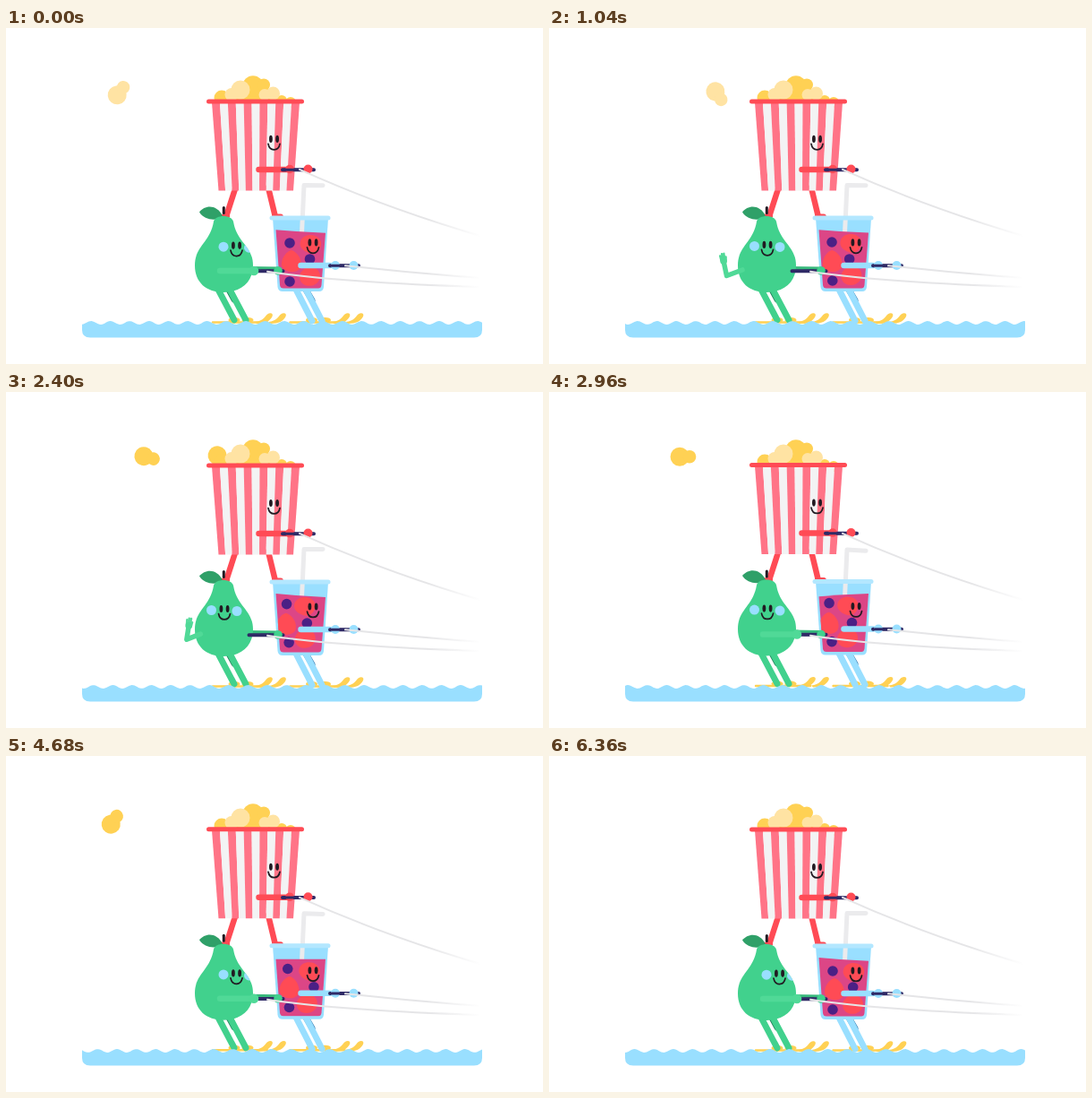
These frames come from a looping animation (600x375 px, 6.4 s). An HTML page:

```html
<!DOCTYPE html>
<html lang="en">
<head>
<meta charset="utf-8">
<title>Water-skiing snacks</title>
<style>
  html, body { margin: 0; width: 100%; height: 100%; overflow: hidden; background: #fff; }
  svg { display: block; width: 100vw; height: 100vh; }
  .line { fill: none; stroke-linecap: round; stroke-linejoin: round; }
</style>
</head>
<body>
<svg viewBox="0 0 600 375">
  <defs>
    <linearGradient id="fade" gradientUnits="userSpaceOnUse" x1="290" y1="0" x2="530" y2="0">
      <stop offset=".75" stop-color="#e5e5e7"/>
      <stop offset="1" stop-color="#e5e5e7" stop-opacity="0"/>
    </linearGradient>
    <clipPath id="juiceClip"><path id="juiceEdge"/></clipPath>
    <clipPath id="pearClip"><use href="#pearBody"/></clipPath>
    <path id="pearBody" d="M232 216C234 208 252 208 254 216C258 240 276 243 276 265C276 284 262 295 243 295C224 295 211 284 211 265C211 243 228 240 232 216Z"/>
    <g id="face">
      <ellipse cx="-3.6" rx="1.9" ry="4.1" fill="#211a22"/>
      <ellipse cx="3.6" rx="1.9" ry="4.1" fill="#211a22"/>
      <path class="line" d="M-6.5 5.5C-5 14 5 14 6.5 5.5" stroke="#211a22" stroke-width="1.7"/>
    </g>
    <g id="skis" fill="#ffd154">
      <path class="line" d="M-19 328.500H42" stroke="#ffd154" stroke-width="2.4"/>
      <ellipse cx="5" cy="326" rx="6.5" ry="3"/>
      <ellipse cx="20" cy="326" rx="6.5" ry="3"/>
      <path d="M28 328C38 327 39 322 42 319.5C46 317 49 319 47.500 322C45 327 40 330 30 330Z"/>
      <path d="M43 328C53 327 54 322 57 319.500C61 317 64 319 62.500 322C60 327 55 330 45 330Z"/>
    </g>
  </defs>

  <g id="flying"></g>
  <g id="pile"></g>

  <g id="skiers">
    <use href="#skis" x="250"/>
    <use href="#skis" x="336.500"/>

    <!-- popcorn -->
    <g class="line" stroke="#ff4b55" stroke-width="6.500" stroke-linecap="butt">
      <path d="M256.500 178L246.500 209M293 178L300.500 209"/>
    </g>
    <path d="M237 211.500C237 206.500 244 207.500 250 207.500V211.500ZM297 211.500V207.500H307Q310 207.500 310 211.500Z" fill="#ff4b55"/>
    <g id="stripes"></g>
    <path class="line" d="M226.500 82H330.500" stroke="#ff4b55" stroke-width="5"/>
    <use href="#face" x="299.500" y="124"/>

    <!-- drink -->
    <g class="line" stroke="#99dfff" stroke-width="7">
      <path d="M335 292L342 304" stroke="#4384b5"/>
      <path d="M323 290L342 327M334 290L353 327"/>
    </g>
    <path d="M298 212H360L355 289Q354.500 294 350 294H309Q304 294 303.500 289Z" fill="#99dfff"/>
    <path id="straw" class="line" stroke="#ebebed" stroke-width="5"/>
    <g clip-path="url(#juiceClip)">
      <rect x="298" y="215" width="64" height="80" fill="#dc4686"/>
      <g id="fruit" fill="#ff4b55">
        <path d="M328 237C331 227 349 228 351 238C352 247 344 253 337 250C331 248 326 243 328 237Z"/>
        <path d="M318 247C325 249 332 260 327 268C321 274 309 271 307 264C306 257 312 248 318 247Z"/>
        <path d="M331 269C338 262 351 267 350 277C349 286 337 290 330 284C326 280 326 273 331 269Z"/>
      </g>
      <g fill="#4b2085"><circle id="berry1" r="5.800"/><circle id="berry2" r="5.800"/><circle id="berry3" r="5.800"/></g>
    </g>
    <path class="line" d="M297 212H360" stroke="#b3e7ff" stroke-width="5"/>
    <use href="#face" x="343" y="239.500"/>

    <!-- pear -->
    <g class="line" stroke="#41d18d" stroke-width="7">
      <path d="M249 292L255 303" stroke="#26845f"/>
      <path d="M236 290L255 326M249 290L268 326"/>
      <path d="M268 269L304 269.500" stroke="#38b97c" stroke-width="6"/>
    </g>
    <path d="M242 210C235 196 222 198 216 205.500C222 215 236 216 242 210Z" fill="#2fa068"/>
    <use href="#pearBody" fill="#41d18d"/>
    <path class="line" d="M243.300 200.500V206.500" stroke="#211a22" stroke-width="3"/>
    <g clip-path="url(#pearClip)">
      <g id="pearFace">
        <circle cx="229.500" cy="243.500" r="5.500" fill="#99dfff"/>
        <circle cx="258" cy="244.500" r="5.500" fill="#99dfff"/>
        <use href="#face" x="244" y="242"/>
      </g>
    </g>

    <!-- arms, handles and ropes -->
    <g class="line">
      <path d="M282.500 158H318" stroke="#ff4b55" stroke-width="6.500"/>
      <path d="M329.500 265H362" stroke="#99dfff" stroke-width="6.500"/>
    </g>
    <path class="line" d="M309 158.300H344M362 265.300H394M271.500 271.300H309.500" stroke="#2f2a66" stroke-width="4"/>
    <g fill="#ff4b55"><circle cx="317" cy="157.500" r="4.800"/><circle cx="337.500" cy="157.500" r="5"/></g>
    <g fill="#99dfff"><circle cx="368" cy="265" r="5"/><circle cx="388.500" cy="265" r="5"/></g>
    <circle cx="304" cy="271" r="4.800" fill="#41d18d"/>
    <path class="line" d="M311 158.300H329M364 265.300H380M285 271.300H296" stroke="#2f2a66" stroke-width="3"/>
    <path id="arm" class="line" stroke="#50d997" stroke-width="6"/>
    <g id="hand">
      <circle id="palm" fill="#50d997"/>
      <path id="fingers" class="line" stroke="#50d997" stroke-width="2.400" d="M-2.500 -1L-3 -6M-.5 -2L-.8 -8M1.500 -1L1.500 -8M2.500 1L3.200 -4"/>
    </g>
  </g>

  <g class="line" stroke="url(#fade)" stroke-width="2">
    <path d="M328 157.800Q420 199.500 530 232"/>
    <path d="M379 265.300Q455 273.500 530 279"/>
    <path d="M292 271.800Q370 284 530 289"/>
  </g>
  <path id="water" fill="#99dfff"/>
</svg>

<script>
const LOOP = 6400, RIPPLE = 1280, TAU = Math.PI * 2;
const YELLOW = '#ffd154', PALE = '#ffe3a3';
const $ = id => document.getElementById(id);
const set = (el, attrs) => { for (const k in attrs) el.setAttribute(k, attrs[k]); };
const mix = (a, b, p) => a + (b - a) * p;
const wave = (t, period, phase = 0) => Math.cos(TAU * (t / period + phase));
const circle = (x, y, r, fill) => `<circle cx="${x}" cy="${y}" r="${r}" fill="${fill}"/>`;

function ramp(t, from, to) {
  const p = Math.min(1, Math.max(0, (t - from) / (to - from)));
  return p * p * (3 - 2 * p);
}

// Popcorn heap and bucket stripes
$('pile').innerHTML =
  `<path d="M236 82L250 74L270 66L292 70L304 78L322 82Z" fill="${YELLOW}"/>` +
  circle(241, 78, 8.5, YELLOW) + circle(276, 64.7, 11.5, YELLOW) + circle(288, 63.5, 7, YELLOW) +
  circle(252, 74.5, 7.5, PALE) + circle(262, 69, 10.5, PALE) +
  circle(308, 81, 6, YELLOW) + circle(318, 83, 6, YELLOW) +
  circle(298.5, 73, 7.5, PALE) + circle(289, 74.5, 6.5, PALE);

$('stripes').innerHTML = Array.from({ length: 11 }, (_, i) => {
  const top = k => 230 + 98 * k / 11, low = k => 237.5 + 83.5 * k / 11;
  const fill = i % 2 ? '#f3f3f4' : '#ff7487';
  return `<path d="M${top(i)} 83H${top(i + 1)}L${low(i + 1)} 181.500H${low(i)}Z" fill="${fill}"/>`;
}).join('');

// Launch time and colour of each kernel blown off the heap
const kernels = [
  [-595, PALE], [165, YELLOW], [829, PALE], [1990, YELLOW], [2501, YELLOW],
  [3680, PALE], [4042, YELLOW], [4825, PALE], [5480, YELLOW]
].map(([start, fill]) => {
  const el = document.createElementNS('http://www.w3.org/2000/svg', 'g');
  el.innerHTML = circle(0, 0, 10.5, fill) + circle(11, 0, 7.3, fill);
  $('flying').append(el);
  return { start, el, turn: fill === PALE ? -10 : 0 };
});

function drawKernels(t) {
  for (const { start, el, turn } of kernels) {
    const x = 220 - (t - start) / 6.22;
    const visible = x < 243 && x > 80;
    el.style.display = visible ? '' : 'none';
    if (!visible) continue;
    const angle = Math.min(55, (x - 146) * 1.9 + turn);
    const y = 70.8 + 4.8 * ((220 - x) / 100) ** 4;
    set(el, { transform: `translate(${x} ${y}) rotate(${angle})` });
  }
}

function drawDrink(t) {
  const tilt = wave(t, RIPPLE, .09), slope = 2 * tilt, dip = 1 - tilt;
  const a = wave(t, LOOP), b = wave(t, LOOP, -.25);
  set($('juiceEdge'), {
    d: `M301.5 ${227 - slope}Q329 ${227 + slope / 2} 357 ${227 + slope}L352.500 287Q352 290.500 349 290.500H310Q306.500 290.500 306 287Z`
  });
  set($('berry1'), { cx: 315 + 2 * a, cy: 238 + 2 * a });
  set($('berry2'), { cx: 339.5 - 4.5 * b, cy: 258 });
  set($('berry3'), { cx: 316.5 + .5 * a, cy: 281 + 2 * a });
  set($('fruit'), { transform: `translate(${3 * a - 2 - b} ${a}) rotate(${-3 * b} 329 260)` });
  set($('straw'), { d: `M330.500 229L333 ${175.5 + dip / 2}L354 ${175.5 + 1.2 * dip}` });
}

function drawPear(t) {
  const front = ramp(t, 300, 700) - ramp(t, 4000, 4400);
  set($('pearFace'), { transform: `translate(${13.5 * (1 - front)} ${.7 * (1 - front)})` });

  const up = ramp(t, 600, 900) - ramp(t, 2350, 2700);
  const swing = wave(t - 1040, 533);
  const hand = [mix(277, 197.5 - 2.5 * swing, up), mix(271, 260, up)];
  const shoulder = [mix(239, 216, up), mix(271, 270, up)];
  const elbow = [mix(257, 198.5, up), mix(271, 276.5, up)];
  set($('arm'), { d: `M${shoulder}L${elbow}L${hand}`, 'stroke-width': mix(6.5, 5.5, up) });
  set($('palm'), { r: mix(5.3, 3.8, up) });
  set($('fingers'), { opacity: up });
  set($('hand'), { transform: `translate(${hand}) rotate(${up * (1 - 9 * swing)})` });
}

function drawWater(t) {
  let d = 'M85 337';
  for (let x = 85; x <= 532; x += 1.5) {
    d += `L${x} ${(329 - 1.9 * wave(x - 95, 21.6, t / RIPPLE)).toFixed(2)}`;
  }
  set($('water'), { d: d + 'L532 337Q532 345.500 523 345.500H94Q85 345.500 85 337Z' });
}

function draw(t) {
  set($('skiers'), { transform: `translate(0 ${.25 * wave(t, RIPPLE, .09) - .25})` });
  drawKernels(t);
  drawDrink(t);
  drawPear(t);
  drawWater(t);
}

const began = performance.now();
function tick() {
  draw((performance.now() - began) % LOOP);
  requestAnimationFrame(tick);
}
draw(0);
requestAnimationFrame(tick);
</script>
</body>
</html>
```
